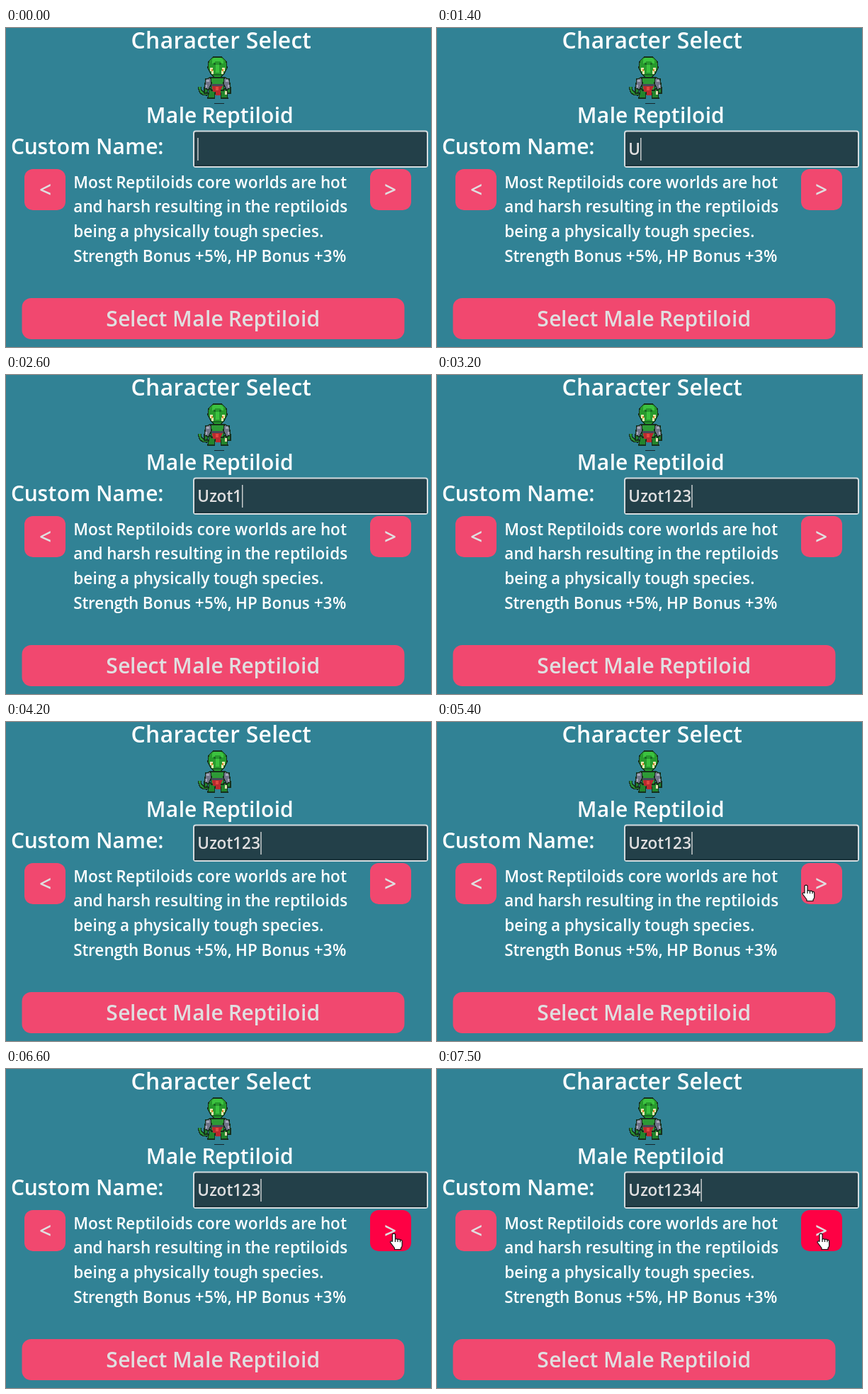
An HTML page for the animation above (8 s loop, 600 px wide and 450 px high).

```html
<!DOCTYPE html>
<html lang="en">
<head>
<meta charset="utf-8">
<title>Character Select</title>
<style>
  html, body { margin: 0; width: 100%; height: 100%; overflow: hidden; background: #318295; }
  svg { display: block; width: 600px; height: 450px; }
  text { font: 600 30px "Open Sans", sans-serif; fill: #fff; white-space: pre; }
  .title { font-size: 31.875px; }
  .small { font-size: 22.5px; }
  .soft { fill: #e0dfe0; }
  .btn { fill: #f1486f; }
</style>
</head>
<body>
<svg viewBox="0 0 600 450">
  <rect width="600" height="450" fill="#318295"/>
  <text class="mid title" x="303.5" y="28.8">Character Select</text>

  <g id="reptile" shape-rendering="crispEdges" stroke="#16301c" stroke-width="1.4">
    <path fill="none" stroke-width="5" d="M273.500 83q0 11 11 10"/>
    <path fill="none" stroke="#2a9433" stroke-width="2.400" d="M273.500 83q0 11 11 10"/>
    <path fill="#23852c" d="M287 86h9l-2 13h-9zM302 86h9l2 13h-9z"/>
    <path fill="#23852c" d="M280 84l5 1-1 7h-4zM317 84l-5 1 1 7h4z"/>
    <path fill="#2d9a36" d="M288 70h21l-2 18h-17z"/>
    <path fill="#6f7388" d="M282 72l7-2 1 8-4 9-6-2zM315 72l-7-2-1 8 4 9 6-2z"/>
    <path fill="#279a2d" d="M292 41h13l6 6 1 9-3 7-6 7h-9l-6-7-3-7 1-9z"/>
    <g stroke="none">
      <path fill="#3cc23f" d="M293 42h10l4 4v4h-4v-3h-8v3h-4v-5zM296 52h5v11h-5z"/>
      <path fill="#186a22" d="M293 49h3v3h-3zM301 49h3v3h-3zM292 65h13v1.500h-13z"/>
      <path fill="#efe6b4" d="M288 56h4v4h1v5h-3v-4h-2zM309 56h-4v4h-1v5h3v-4h2z"/>
      <path fill="#d48a2c" d="M290 58h2v3h-2zM305 58h2v3h-2z"/>
      <path fill="#a6a9b8" d="M283 73h4v3h-4zM310 73h4v3h-4zM282 80h2v4h-2zM313 80h2v4h-2z"/>
      <path fill="#454a58" d="M290 79h17v3h-17z"/>
      <path fill="#ba2a2e" d="M291 82h15l-3 6v7h-7v-5h-4z"/>
      <path fill="#e0483f" d="M296 83h4v5h-4z"/>
      <path fill="#e5dcb2" d="M309 89h3v5h-3z"/>
    </g>
    <path fill="#17252b" stroke="none" d="M294 106h14v1.400h-14z"/>
  </g>

  <text class="mid" x="301.8" y="134.300">Male Reptiloid</text>
  <text x="7" y="177.600">Custom Name:</text>
  <rect x="265" y="145.500" width="330" height="50.500" rx="3" fill="#234049" stroke="#d5dcdf" stroke-width="2"/>
  <rect x="266" y="193" width="328" height="2" fill="#1c343c"/>
  <text id="name" class="small soft" x="270.300" y="179.200"></text>
  <rect id="caret" y="155" width="1.300" height="32" fill="#e0e0e0"/>

  <rect class="btn" x="26" y="199" width="58" height="58" rx="12"/>
  <text class="mid soft" x="55.500" y="239.300">&lt;</text>
  <rect id="next" class="btn" x="514" y="199" width="58" height="58" rx="12"/>
  <text class="mid soft" x="542.500" y="239.300">&gt;</text>

  <text class="small" x="95.300" y="225.600">Most Reptiloids core worlds are hot</text>
  <text class="small" x="95.300" y="260.300">and harsh resulting in the reptiloids</text>
  <text class="small" x="95.300" y="295">being a physically tough species.</text>
  <text class="small" x="95.300" y="329.700">Strength Bonus +5%, HP Bonus +3%</text>

  <rect class="btn" x="22.500" y="381" width="540" height="58" rx="13"/>
  <text class="mid soft" x="292.300" y="420.700">Select Male Reptiloid</text>

  <g id="pointer" fill="#fff" stroke="#111" stroke-width="1.200" stroke-linejoin="round">
    <path id="arrow" d="M0 0v17l4-4 3 7 3-1.500-3-6.500h5.500z"/>
    <g id="hand">
      <path d="M-2 0q2-2 4 0v7q2-1 3.500.5 2-1 3.500.8 2.500-.5 2.700 1.700v6q0 2-1.700 3.500v2h-9v-2l-6-8q0-2.500 3-1.200z"/>
      <path fill="none" d="M2 7v4M5.500 7.500v3.500M9 8.300v3"/>
    </g>
  </g>
</svg>
<script>
const $ = id => document.getElementById(id);
const LOOP = 8000, STEP = 100;
const SCALE = 600 / 640; // the interface is laid out 640 wide
const ctx = document.createElement("canvas").getContext("2d");

const fullName = "Uzot1234";
const keyTimes = [1400, 1600, 1800, 2100, 2600, 2800, 3200, 6700];

// pointer stops: time, x, y
const path = [
  [5100, 190, 270], [5200, 325, 264], [5300, 448, 248], [5400, 521, 231],
  [5500, 562, 236], [5600, 547.5, 233], [7200, 547.5, 233], [7500, 542, 233]
];

// Places glyphs with whole-pixel advances in layout space; returns the end x.
function setText(el, str, left) {
  const size = parseFloat(getComputedStyle(el).fontSize) / SCALE;
  ctx.font = `600 ${size}px "Open Sans", sans-serif`;
  const widths = [...str].map(c => Math.round(ctx.measureText(c).width) * SCALE);
  const total = widths.reduce((a, b) => a + b, 0);
  let x = el.classList.contains("mid") ? left - total / 2 : left;
  const xs = widths.map(w => (x += w) - w);
  el.textContent = str;
  if (str) el.setAttribute("x", xs.join(" "));
  return x;
}

function pointerAt(t) {
  const i = path.findIndex(p => p[0] > t);
  if (i < 0) return path[path.length - 1].slice(1);
  const [t0, x0, y0] = path[i - 1], [t1, x1, y1] = path[i];
  const k = (t - t0) / (t1 - t0);
  return [x0 + (x1 - x0) * k, y0 + (y1 - y0) * k];
}

function draw(now) {
  const t = Math.floor(now % LOOP / STEP) * STEP;
  const typed = fullName.slice(0, keyTimes.filter(k => k <= t).length);
  $("caret").setAttribute("x", setText($("name"), typed, 270.3));

  const shown = t >= path[0][0];
  $("pointer").style.display = shown ? "" : "none";
  if (shown) $("pointer").setAttribute("transform", `translate(${pointerAt(t)})`);
  $("arrow").style.display = t < 5400 ? "" : "none";
  $("hand").style.display = t < 5400 ? "none" : "";
  $("next").style.fill = t >= 5500 ? "#fe0144" : "";
}

for (const el of document.querySelectorAll("text:not(#name)"))
  setText(el, el.textContent, +el.getAttribute("x"));

let start;
function tick(now) {
  start ??= now;
  draw(now - start);
  requestAnimationFrame(tick);
}
draw(0);
requestAnimationFrame(tick);
</script>
</body>
</html>
```
